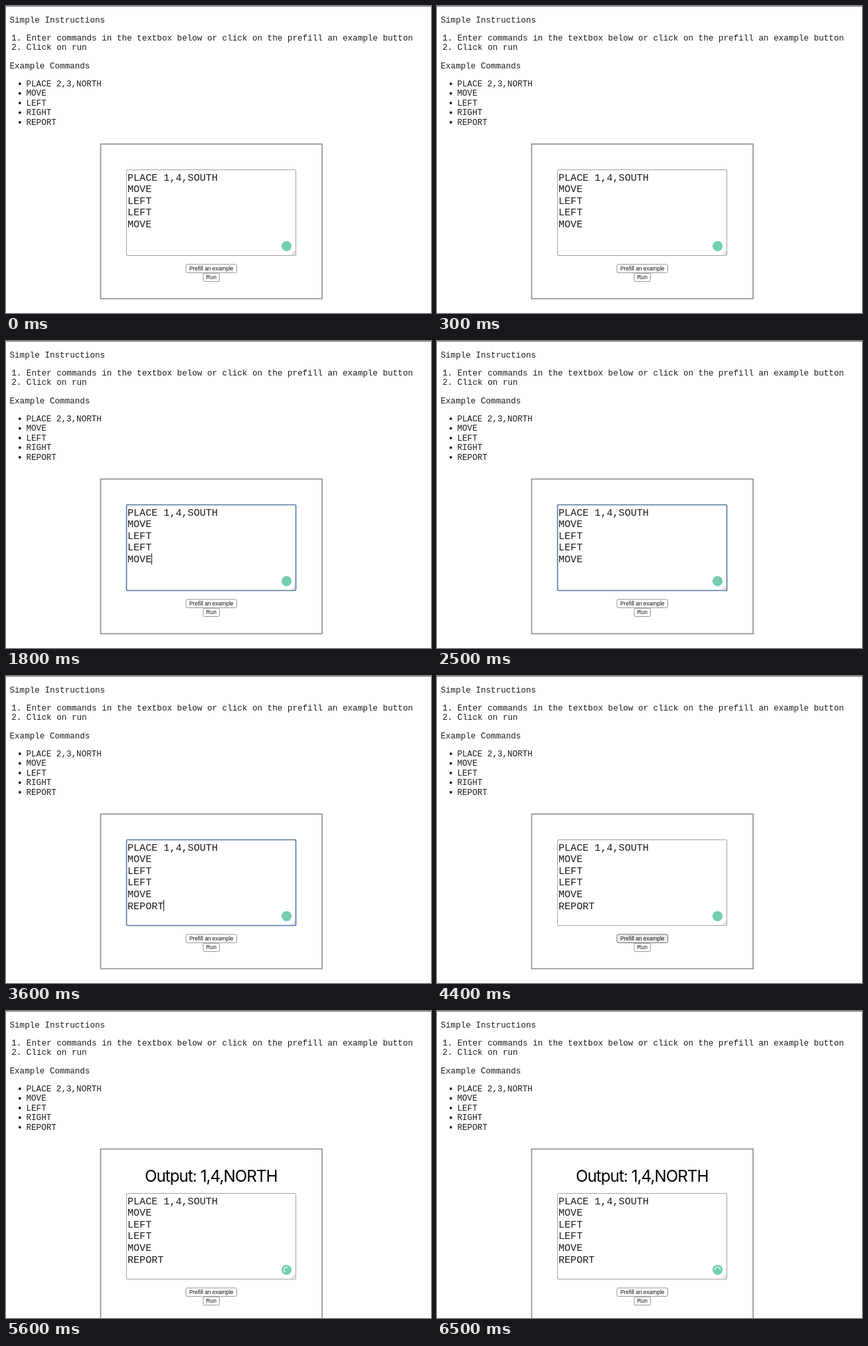
Animation of 640 by 462 pixels, one loop 6.6 s. Source, as an HTML page:

```html
<!DOCTYPE html>
<html lang="en">
<head>
<meta charset="utf-8">
<title>Command runner</title>
<style>
  html, body { margin: 0; width: 100%; height: 100%; overflow: hidden; background: #fff; }
  svg { display: block; }
  .mono { font-family: "Liberation Mono", "Courier New", monospace; fill: #1c1c1c; }
  .page { font-size: 12.6px; }
  .code { font-size: 15.1px; }
  .label { font: 8.37px "Liberation Sans", Arial, sans-serif; fill: #111; text-anchor: middle; }
  .output { font: 24.2px Inter, sans-serif; letter-spacing: -.04em; fill: #000; text-anchor: middle; }
  .button rect { fill: #fff; stroke: #959595; }
  .button.hover rect { fill: #efefef; stroke: #6c6c6c; }
  #area { fill: #fff; stroke: #a2a2a2; stroke-width: 1; }
  #area.focus { stroke: #53779f; stroke-width: 1.6; }
</style>
</head>
<body>
<svg id="stage" width="640" height="462" viewBox="0 0 640 462">
  <rect width="640" height="462" fill="#fff"/>
  <rect width="640" height="1" fill="#777"/>
  <g id="page" class="mono page"></g>
  <rect id="panel" x="142.5" y="207.7" width="333.5" height="232.8" fill="none" stroke="#929292" stroke-width="1.7"/>
  <text id="output" class="output" x="308.7" y="257">Output: 1,4,NORTH</text>
  <g id="form">
    <rect id="area" x="181.5" y="246.5" width="255" height="129" rx="1.5"/>
    <path d="M430 374.5l6-6M433.5 374.5l2.5-2.5" stroke="#999" stroke-width=".8"/>
    <g id="code" class="mono code"></g>
    <rect id="caret" width="1" height="17" fill="#111"/>
    <g id="prefill" class="button">
      <rect x="271" y="388.8" width="76.5" height="12.6" rx="2"/>
      <text class="label" x="309.2" y="398">Prefill an example</text>
    </g>
    <g id="run" class="button">
      <rect x="297" y="402.2" width="24.5" height="12.4" rx="2"/>
      <text class="label" x="309.2" y="411.3">Run</text>
    </g>
  </g>
  <g id="badge">
    <circle r="7.6" fill="#75cdb5"/>
    <path id="spinner" d="M0 -4A4 4 0 0 1 0 4" fill="none" stroke="#fff" stroke-width="1.2" stroke-linecap="round"/>
  </g>
</svg>
<script>
const LOOP = 6600, LINE = 17.6, CHAR = 15.1 * 0.6, SPIN = 770;
const $ = id => document.getElementById(id);

function add(parent, tag, attrs, text = "") {
  const el = document.createElementNS("http://www.w3.org/2000/svg", tag);
  for (const k in attrs) el.setAttribute(k, attrs[k]);
  el.textContent = text;
  parent.append(el);
  return el;
}

[
  [5.5, 24.5, "Simple Instructions"],
  [8.2, 52, "1. Enter commands in the textbox below or click on the prefill an example button"],
  [8.2, 66.4, "2. Click on run"],
  [5.5, 93.6, "Example Commands"]
].forEach(([x, y, text]) => add($("page"), "text", { x, y }, text));

["PLACE 2,3,NORTH", "MOVE", "LEFT", "RIGHT", "REPORT"].forEach((text, i) => {
  const y = 120.6 + i * 14.5;
  add($("page"), "circle", { cx: 20.8, cy: y - 3.6, r: 1.9 });
  add($("page"), "text", { x: 30.5, y }, text);
});

const lines = ["PLACE 1,4,SOUTH", "MOVE", "LEFT", "LEFT", "MOVE", ""].map((text, i) =>
  add($("code"), "text", { x: 183, y: 262.6 + i * LINE }, text));

// Each track lists [start time, value] steps.
const tracks = {
  typed: [[0, ""], [2600, "RE"], [2800, "REPO"], [2900, "REPORT"]],
  focus: [[0, false], [1700, true], [4400, false]],
  row: [[0, 4], [2000, 5]],
  caret: [[0, false], [1700, true], [2500, false], [2600, true], [3200, false], [3600, true], [4200, false]],
  hover: [[0, ""], [1100, "run"], [1700, ""], [3800, "prefill"], [4000, "run"], [4400, "prefill"], [5400, ""]],
  done: [[0, false], [4500, true]],
  badgeY: [[0, 361.3], [5400, 389.5]],
  busy: [[0, false], [4800, true]]
};

function at(name, t) {
  let value;
  for (const [start, v] of tracks[name]) if (t >= start) value = v;
  return value;
}

const show = (el, on) => el.setAttribute("visibility", on ? "visible" : "hidden");

function render(t) {
  const done = at("done", t), row = at("row", t), hover = at("hover", t);
  lines[5].textContent = at("typed", t);
  $("area").classList.toggle("focus", at("focus", t));
  $("caret").setAttribute("x", 182.7 + lines[row].textContent.length * CHAR);
  $("caret").setAttribute("y", 249 + row * LINE);
  show($("caret"), at("caret", t));
  for (const id of ["prefill", "run"]) $(id).classList.toggle("hover", hover === id);
  show($("output"), done);
  $("form").setAttribute("transform", `translate(0 ${done ? 28 : 0})`);
  $("panel").setAttribute("height", done ? 260.8 : 232.8);
  $("badge").setAttribute("transform", `translate(422.5 ${at("badgeY", t)})`);
  show($("spinner"), at("busy", t));
  $("spinner").setAttribute("transform", `rotate(${(t - 5100) * 360 / SPIN - 25})`);
}

const begin = performance.now();
function tick() {
  render((performance.now() - begin) % LOOP);
  requestAnimationFrame(tick);
}
tick();
</script>
</body>
</html>
```
